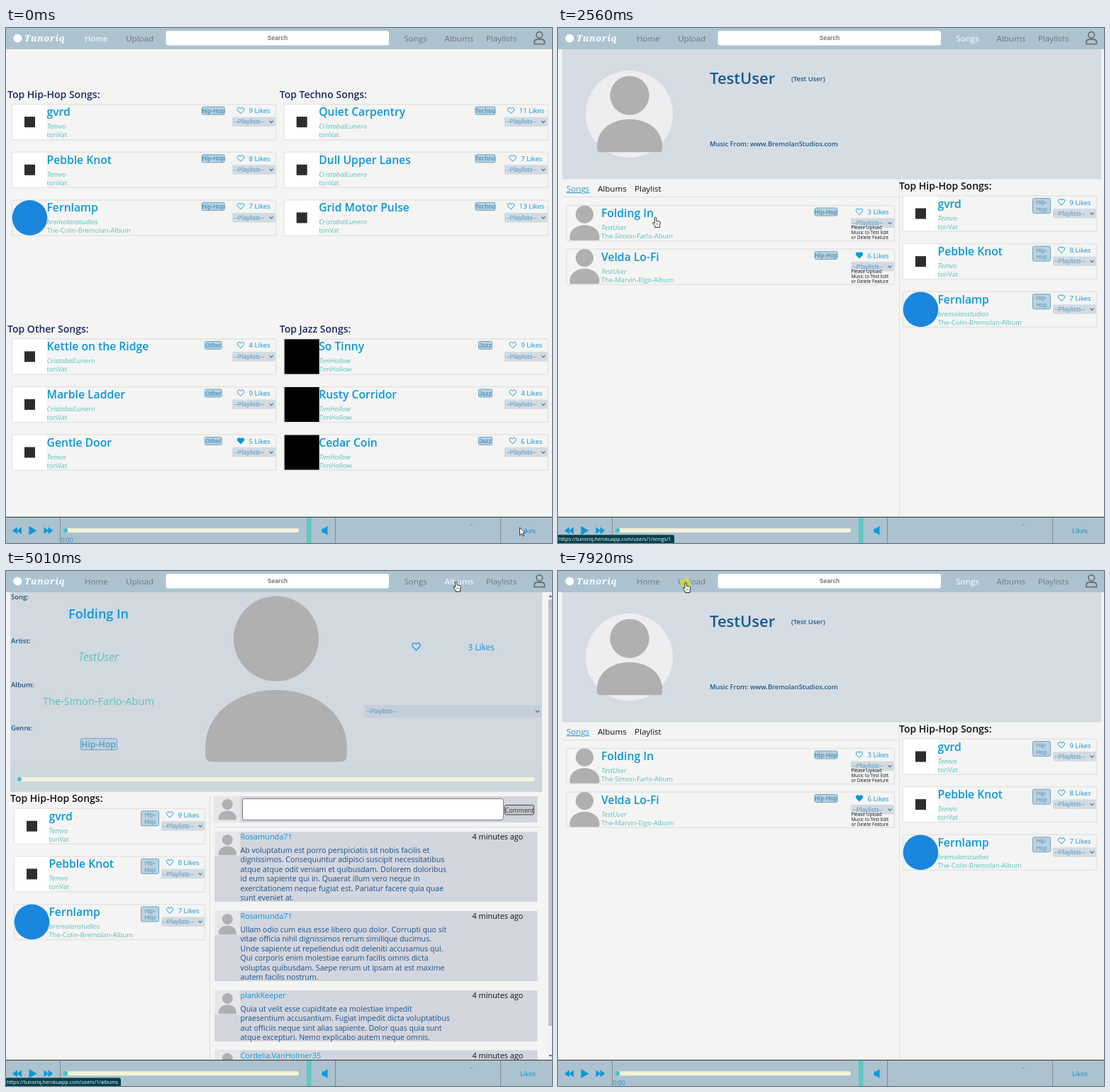
Write an HTML page that moves like this. It is 770 px wide and 727 px high and loops after 8000 ms.

```html
<!DOCTYPE html>
<html lang="en">
<head>
<meta charset="utf-8">
<title>Music site tour</title>
<style>
html, body { margin: 0; width: 100%; height: 100%; overflow: hidden; background: #f4f4f3; }
svg { display: block; width: 100vw; height: 100vh; }
text { font-family: "Open Sans", "Noto Sans", sans-serif; white-space: pre; }
.ui { font-family: "Liberation Sans", Arial, sans-serif; }
.logo { font-family: "Noto Serif", serif; letter-spacing: .8px; }
</style>
</head>
<body>
<svg id="stage" viewBox="0 0 770 727"></svg>
<script>
const BLUE = '#0b98d9', TEAL = '#58c4be', NAVY = '#1b5186', GREY = '#b0b0b0';
const LOOP = 8000;

// Drawing helpers, each returning SVG markup
const text = (x, y, s, size, fill, extra = '') =>
  `<text x="${x}" y="${y}" font-size="${size}" fill="${fill}" ${extra}>${s}</text>`;
const rect = (x, y, w, h, fill, extra = '') =>
  `<rect x="${x}" y="${y}" width="${w}" height="${h}" fill="${fill}" ${extra}/>`;
const circle = (x, y, r, fill) => `<circle cx="${x}" cy="${y}" r="${r}" fill="${fill}"/>`;
const path = (d, fill, extra = '') => `<path d="${d}" fill="${fill}" ${extra}/>`;
const group = (id, body) => `<g id="${id}">${body}</g>`;
const BOLD = 'font-weight="600"', MEDIUM = 'font-weight="500"';
const ITALIC = 'font-style="italic"', MID = 'text-anchor="middle"', UI = 'class="ui"';

const person = (cx, top, w) =>
  `<g transform="translate(${cx} ${top}) scale(${w / 200})" fill="${GREY}"><circle cy="60" r="60"/>
  <path d="M-100 224Q-100 234-90 234H90Q100 234 100 224V215C100 165 55 132.5 0 132.5S-100 165-100 215Z"/></g>`;

const heart = (x, y, full, k = 1) =>
  path('M5 9L1.2 5.2C-.6 3.2.5.7 2.6.7 3.8.7 4.5 1.3 5 2 5.5 1.3 6.2.7 7.4.7 9.5.7 10.6 3.2 8.8 5.2Z',
    full ? BLUE : 'none',
    `stroke="${BLUE}" stroke-linejoin="round" transform="translate(${x} ${y}) scale(${k})"`);

const select = (x, y, w, h, fill) =>
  rect(x, y, w, h, fill, 'rx="2"') +
  text(x + 2, y + h / 2 + 3, '--Playlists--', 8.7, '#5596c0', UI) +
  path(`M${x + w - 8.5} ${y + h / 2 - 1.2}l2.5 2.5 2.5-2.5`, 'none', 'stroke="#44708f" stroke-width="1.2"');

const badge = (cx, y, lines, w) =>
  rect(cx - w / 2, y, w, lines.length * 10 + 1, '#bdd1de', 'rx="2" stroke="#68a5c8"') +
  lines.map((s, i) => text(cx, y + 8.6 + i * 9.6, s, 8.3, '#4e97c2', `${lines[1] ? '' : 'font-weight="700"'} ${MID} class="ui"`)).join('');

const TILES = {
  plain: (x, y) => rect(x, y, 49, 49, '#fff') + rect(x + 17, y + 17, 15, 15, '#2d2d2d'),
  disc: (x, y) => circle(x + 24.5, y + 24.5, 24.8, '#1a87dc'),
  dark: (x, y) => rect(x, y, 49, 49, '#000'),
  user: (x, y) => person(x + 25, y - .5, 42)
};

const song = (title, artist, album, likes, tile = 'plain', full = false) =>
  ({ title, artist, album, likes, tile, full });

// One song card; the right-hand controls hang off the right edge
function card(x, y, w, s, genre, badgeFn) {
  const r = x + w, wide = s.likes > 9 ? 2.5 : 0;
  return rect(x + .5, y + .5, w - 1, 50, 'none', 'stroke="#e3e4e4" stroke-width="1.5" rx="1"') +
    TILES[s.tile](x + 1, y + 1) +
    text(x + 49.5, y + 17, s.title, 15.7, BLUE, BOLD) +
    text(x + 49.5, y + 35, s.artist, 9.7, TEAL, ITALIC) +
    text(x + 49.5, y + 47, s.album, 9.4, TEAL) +
    badgeFn(r, y + 4, genre) +
    heart(r - 55 - wide, y + 4.5, s.full) +
    text(r - 38.5 - wide, y + 13, s.likes + ' Likes', 9.6, BLUE) +
    select(r - 62, y + 18.5, 61, 13.5, '#d3dbe2');
}
const BADGE_W = { 'Hip-Hop': 32, Techno: 28, Other: 24, Jazz: 19 };
const inlineBadge = dx => (r, y, g) => badge(r - dx, y, [g], BADGE_W[g]);
const stackedBadge = (r, y, g) => badge(r - 78, y, ['Hip-', 'Hop'], 25);

const STEP = 67.6;
const hipHop = [
  song('gvrd', 'Temvo', 'tonVat', 9),
  song('Pebble Knot', 'Temvo', 'tonVat', 8),
  song('Fernlamp', 'bremolanstudios', 'The-Colin-Bremolan-Album', 7, 'disc')
];
const techno = [['Quiet Carpentry', 11], ['Dull Upper Lanes', 7], ['Grid Motor Pulse', 13]]
  .map(([t, n]) => song(t, 'CristobalLunero', 'tonVat', n));
const other = [
  song('Kettle on the Ridge', 'CristobalLunero', 'tonVat', 4),
  song('Marble Ladder', 'CristobalLunero', 'tonVat', 9),
  song('Gentle Door', 'Temvo', 'tonVat', 5, 'plain', true)
];
const jazz = [['So Tinny', 9], ['Rusty Corridor', 4], ['Cedar Coin', 6]]
  .map(([t, n]) => song(t, 'TimHollow', 'TimHollow', n, 'dark'));

function homePage() {
  const block = (x, y, genre, songs) =>
    text(x, y, `Top ${genre} Songs:`, 14, '#1c2a60', BOLD) +
    songs.map((s, i) => card(x + 6, y + 8.2 + i * STEP, 373, s, genre, inlineBadge(88.7))).join('');
  return block(2, 99, 'Hip-Hop', hipHop) + block(385.7, 99, 'Techno', techno) +
    block(2, 430.2, 'Other', other) + block(385.7, 430.2, 'Jazz', jazz);
}

const sideCards = (x, y, w) =>
  hipHop.map((s, i) => card(x, y + i * STEP, w, s, 'Hip-Hop', stackedBadge)).join('');

function profilePage(tab, body) {
  const tabs = [['Songs', 12], ['Albums', 56], ['Playlist', 108]].map(([s, x]) =>
    text(x, 231, s, 11.6, s === tab ? '#2d96cd' : '#111', s === tab ? 'text-decoration="underline"' : '')).join('');
  return rect(6, 30, 760, 183.5, '#d5dce3') +
    circle(100.5, 121.5, 61.5, '#efedf0') + person(101, 67.7, 92) +
    text(214, 79, 'TestUser', 22, '#185a90', BOLD) +
    text(329, 74.5, '(Test User)', 9.4, '#185a90', BOLD) +
    text(214, 166.5, 'Music From: www.BremolanStudios.com', 9.3, '#185a90', BOLD) +
    tabs + rect(6, 238, 475, 1, '#dedfe0') + rect(481, 213, 1, 477, '#dedfe0') +
    text(481, 228, 'Top Hip-Hop Songs:', 14, '#111', BOLD) + sideCards(486, 236.5, 274) + body;
}

function ownSongs() {
  const note = ['Please Upload', 'Music to Test Edit', 'or Delete Feature'];
  return [
    song('Folding In', 'TestUser', 'The-Simon-Farlo-Abum', 3, 'user'),
    song('Velda Lo-Fi', 'TestUser', 'The-Marvin-Elgo-Album', 6, 'user', true)
  ].map((s, i) => {
    const y = 250 + i * 61.5;
    return card(11.5, y, 463.5, s, 'Hip-Hop', inlineBadge(97)) +
      note.map((n, k) => text(413.5, y + 34 + k * 7.2, n, 6.5, '#111', MEDIUM)).join('');
  }).join('');
}

const editIcon = x =>
  path(`M${x + 7} 261H${x + 1}V269.5H${x + 9.5}V266`, 'none', `stroke="${BLUE}" stroke-width="1.4"`) +
  path(`M${x + 4} 267l.6-2.6 5.4-5.4 2 2-5.4 5.4Z`, BLUE);

const ownAlbums = () => [['The-Simon-Farlo-Abum', 83], ['The-Marvin-Elgo-Album', 243]].map(([s, x]) =>
  editIcon(x - 54) + person(x, 254, 100) + text(x, 383, s, 9.4, BLUE, MID)).join('');

const COMMENTS = [
  ['Rosamunda71', 368, 99, ['Ab voluptatum est porro perspiciatis sit nobis facilis et',
    'dignissimos. Consequuntur adipisci suscipit necessitatibus', 'atque atque odit veniam et quibusdam. Dolorem doloribus',
    'id eum sapiente qui in. Quaerat illum vero neque in', 'exercitationem neque fugiat est. Pariatur facere quia quae', 'sunt eveniet at.']],
  ['Rosamunda71', 480, 99, ['Ullam odio cum eius esse libero quo dolor. Corrupti quo sit',
    'vitae officia nihil dignissimos rerum similique ducimus.', 'Unde sapiente ut repellendus odit deleniti accusamus qui.',
    'Qui corporis enim molestiae earum facilis omnis dicta', 'voluptas quibusdam. Saepe rerum ut ipsam at est maxime', 'autem facilis nostrum.']],
  ['plankKeeper', 592, 72, ['Quia ut velit esse cupiditate ea molestiae impedit',
    'praesentium accusantium. Fugiat impedit dicta voluptatibus', 'aut officiis neque sint alias sapiente. Dolor quas quia sunt',
    'atque excepturi. Nemo explicabo autem neque omnis.']],
  ['Cordelia.VanHolmer35', 676.5, 40, []]
];

function songPage() {
  const label = (s, y) => text(7, y, s, 9.5, NAVY, BOLD);
  const value = (s, y, size, fill, extra) => text(130.5, y, s, size, fill, `${MID} ${extra}`);
  const details = label('Song:', 40) + label('Artist:', 102) + label('Album:', 163.5) + label('Genre:', 225) +
    value('Folding In', 67, 18, BLUE, BOLD) + value('TestUser', 127, 15.5, TEAL, ITALIC) +
    value('The-Simon-Farlo-Abum', 188.5, 14.6, TEAL, '') +
    rect(105.5, 236.5, 51, 16, '#bdd1de', 'rx="2" stroke="#68a5c8"') + value('Hip-Hop', 249.3, 12.4, '#4e9fcb', BOLD);
  const comments = COMMENTS.map(([who, y, h, lines]) =>
    rect(294, y, 455.5, h, '#d3d6df') + rect(294, y, 36.5, 34, '#e6e6eb') + person(312.3, y + 4, 25) +
    text(330.5, y + 11, who, 10.9, BLUE, MEDIUM) + text(657.5, y + 11, '4 minutes ago', 10.9, '#111', MEDIUM) +
    lines.map((s, i) => text(330.5, y + 29.5 + i * 13.5, s, 10.6, NAVY, MEDIUM)).join('')).join('');
  return rect(6, 30, 750, 281.5, '#d1d8df') + rect(6, 275, 750, 36.5, '#cdd7de') + group('details', details) +
    person(381, 35.5, 200) + heart(572.5, 101, false, 1.2) + text(651.5, 111.5, '3 Likes', 11.9, BLUE) +
    select(505.5, 189, 250, 18, '#c5cfd9') +
    rect(16, 291, 729.5, 6, '#f3f3da', 'rx="3"') + circle(19, 294, 3, '#45bfc7') +
    text(6, 326, 'Top Hip-Hop Songs:', 14, '#111', BOLD) + group('side', sideCards(11, 334.7, 270)) +
    rect(287, 318, 1, 372, '#dcdddd') + rect(294, 361, 462, 1, '#dcdddd') +
    rect(293.5, 318, 456, 37, '#d3d6df') + rect(293.5, 318, 37, 37, '#e6e6eb') + person(312.3, 322, 25) +
    rect(333.5, 321.5, 368, 30, '#fff', 'rx="3" stroke="#777"') +
    rect(703.5, 330.5, 41, 13.5, '#c6c7cb', 'rx="2" stroke="#444"') +
    text(724, 340.8, 'Comment', 8.8, '#333', MID) + comments;
}

const scrollbar = () => rect(764, 30, 6, 660, '#f1f1f1') + rect(765, 40, 5, 602, '#c1c1c1') +
  path('M765.5 37l2.5-3 2 3Z', '#555') + path('M765.5 683l2.5 3 2-3Z', '#555');

function navBar() {
  const items = [['Home', 111], ['Upload', 169], ['Songs', 561.5], ['Albums', 618.5], ['Playlists', 677]];
  return rect(0, 0, 770, 30, '#adc3d0') + circle(16.5, 14.5, 6, '#fff') +
    text(26, 18.5, 'Tunoriq', 12.5, '#fff', 'class="logo" font-weight="900" font-style="italic"') +
    rect(225.5, 4, 314.5, 20.5, '#fff', 'rx="3"') +
    text(383, 17.3, 'Search', 8.6, '#777', `${MID} class="ui" font-weight="700"`) +
    items.map(([s, x]) => text(x, 19, s, 11.6, '#777', `id="nav${s}"`)).join('') +
    `<g fill="none" stroke="#707579" stroke-width="1.8"><circle cx="752.3" cy="9.8" r="4.3"/>
    <path d="M745 22.7V20.5C745 17.6 747 16 749.5 16H755C757.6 16 759.6 17.6 759.6 20.5V22.7Z"/></g>`;
}

const player = () => rect(0, 690, 770, 37, '#adc2cf') + rect(0, 690, 770, 1, '#333') +
  [76, 464, 697].map(x => rect(x, 691, 1, 36, '#858d92')).join('') +
  path('M16 704.5V714.5L9 709.5ZM22 704.5V714.5L15.5 709.5ZM32.5 703L43.5 709.5 32.5 716ZM53.5 704.5V714.5L60 709.5ZM59.5 704.5V714.5L66.5 709.5Z', BLUE) +
  path('M445.5 706.5H448.5L453.5 703V716L448.5 712.5H445.5Z', BLUE) +
  rect(81, 706.3, 332, 6, '#f3f3da', 'rx="3"') + circle(84, 709.3, 3.2, '#45bfc7') +
  rect(424, 691, 6.5, 36, '#5bc8c4') + rect(655, 700, 2.5, 2, '#4fb9bd') +
  text(77, 725.5, '0:00', 9, '#2b8fc4') + text(725, 713, 'Likes', 9.5, BLUE);

const statusBar = () => path('', '#043f4d', 'id="statusBox"') + text(1, 724.2, '', 7.1, '#fff', 'id="statusText"');

const cursor = () => group('arrow', path('M0 0V11L2.6 8.7 4.3 12.3 6 11.5 4.4 8H7.8Z', '#fff', 'stroke="#222" stroke-width=".9"')) +
  group('hand', path('M-1.2.8Q0-.8 1.2.8V5.2L5.6 6Q7 6.5 6.8 8L6 11.5V14.5H-.6V13L-3.6 9Q-4 7.2-2.6 7.5L-1.2 8.6Z',
    '#fff', 'stroke="#222" stroke-width=".95" stroke-linejoin="round"') +
    path('M1.3 11.5V8.6M3.2 11.5V8.6', 'none', 'stroke="#444" stroke-width=".6"'));

document.getElementById('stage').innerHTML =
  group('home', homePage()) + group('songs', profilePage('Songs', ownSongs())) +
  group('albums', profilePage('Albums', ownAlbums())) + group('track', songPage()) +
  group('scroll', scrollbar()) + navBar() + player() + group('status', statusBar()) +
  `<circle id="click" r="7" fill="#d8dc32" opacity=".8"/>` + group('pointer', cursor());

const $ = id => document.getElementById(id);
const clamp = v => Math.max(0, Math.min(1, v));
const ease = p => p * p * (3 - 2 * p);

// Page visits: id, fade-in start, fade-out start, fade-out end
const VISITS = [
  ['home', -999, 910, 1215], ['songs', 1215, 2870, 3170], ['track', 3170, 5010, 5200],
  ['albums', 5200, 6680, 6870], ['songs', 6870, 9000, 9100]
];
// Pointer stops: arrival time, x, y
const STOPS = [
  [0, 724.5, 705], [70, 724.5, 705], [210, 579, 243], [390, 579, 243], [760, 587.5, 20], [1500, 587.5, 20],
  [1710, 583, 44], [1770, 578, 48], [2560, 137.5, 267], [2870, 137.5, 267], [3350, 149, 261], [3740, 149, 261],
  [4460, 634.7, 14.5], [5870, 634.7, 14.5], [6580, 28, 226], [7530, 28, 226], [7900, 180, 16], [LOOP, 180, 16]
];
const HANDS = [[700, 1720], [2480, 3180], [4380, 5900], [6500, 7570], [7820, LOOP]];
const CLICKS = [[4860, 5010, 634.5, 14.5], [7920, LOOP, 180, 17]];
// Status hints: shown from, fade-in ms, hidden from, fade-out ms, widened at, path
const HINTS = [
  [900, 60, 1700, 150, 910, 'songs'], [2440, 90, 3230, 350, 2950, 'songs/1'],
  [4490, 130, 5900, 150, LOOP, 'albums'], [6480, 90, 7540, 120, LOOP, 'songs']
];

function draw(t) {
  const alpha = {};
  for (const [id, start, out, end] of VISITS) {
    const p = clamp((t - start) / 650), shown = p * (2 - p) * (1 - clamp((t - out) / (end - out)));
    alpha[id] = Math.max(alpha[id] || 0, shown);
  }
  for (const id in alpha) {
    $(id).style.opacity = alpha[id];
    $(id).style.display = alpha[id] ? '' : 'none';
  }
  $('scroll').style.opacity = t > 3170 && t < 5200 ? 1 : 0;
  $('details').style.opacity = clamp((t - 3420) / 500);
  $('side').setAttribute('transform', `translate(${t < 3420 ? -5 : 0} 0)`);

  const active = t < 910 ? 'Home' : t >= 5010 && t < 6680 ? 'Albums' : 'Songs';
  for (const s of ['Home', 'Songs', 'Albums']) $('nav' + s).setAttribute('fill', s === active ? '#fff' : '#777');

  const i = Math.max(1, STOPS.findIndex(s => s[0] > t));
  const [t0, x0, y0] = STOPS[i - 1], [t1, x1, y1] = STOPS[i];
  const p = ease(clamp((t - t0) / (t1 - t0)));
  $('pointer').setAttribute('transform', `translate(${x0 + (x1 - x0) * p} ${y0 + (y1 - y0) * p})`);
  const hand = HANDS.some(([a, b]) => t >= a && t < b);
  $('hand').style.display = hand ? '' : 'none';
  $('arrow').style.display = hand ? 'none' : '';

  const click = CLICKS.find(([a, b]) => t >= a && t < b);
  $('click').style.display = click ? '' : 'none';
  if (click) $('click').setAttribute('transform', `translate(${click[2]} ${click[3]})`);

  const hint = HINTS.find(h => t >= h[0] && t < h[2] + h[3]);
  $('status').style.opacity = hint ? clamp((t - hint[0]) / hint[1]) * (1 - clamp((t - hint[2]) / hint[3])) : 0;
  if (hint) {
    const w = t >= hint[4] ? 255 : hint[5] === 'songs/1' ? 164 : 162;
    $('statusBox').setAttribute('d', `M0 715.5H${w - 3}Q${w} 715.5 ${w} 718.5V727H0Z`);
    $('statusText').textContent = 'https://tunoriq.herokuapp.com/users/1/' + hint[5];
  }
}

const begin = performance.now();
function tick() {
  draw((performance.now() - begin) % LOOP);
  requestAnimationFrame(tick);
}
tick();
</script>
</body>
</html>
```
